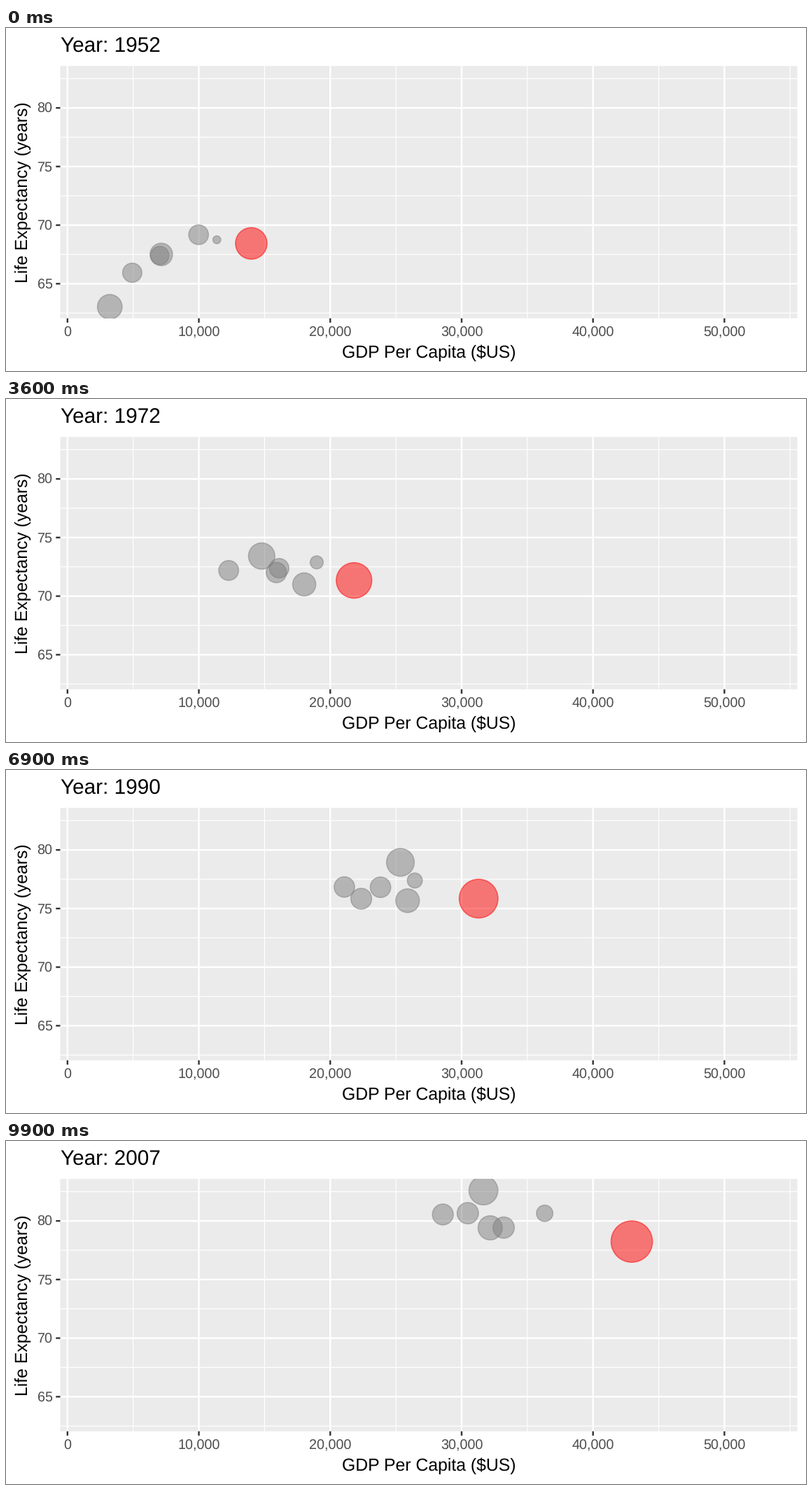
These frames come from a looping animation (1143 px wide and 490 px high, 10 s). A matplotlib script:

```python
import numpy as np
import matplotlib.pyplot as plt
from matplotlib.animation import FuncAnimation
from matplotlib.patches import Circle, Rectangle

plt.rcParams["font.family"] = "Liberation Sans"
plt.rcParams["text.hinting"] = "none"

W, H, DPI = 1143, 490, 64
FRAMES, INTERVAL = 100, 100
LEFT, RIGHT, TOP, BOTTOM = 77.5, 1130.6, 54.2, 414.7
X_LIM = (-0.55, 55.55)       # thousand dollars
Y_LIM = (62.051, 83.582)     # years of life
UNIT = 162 / 72              # px per point of the plot's theme
LINE = 1.067 * UNIT          # major line width in px
STROKE = 0.709 * UNIT        # bubble outline in px
FONT = 11 * UNIT
GREY, RED = (127 / 255,) * 3, (1, 0, 0)

START, END = 1952, 2007
GDP_YEARS = (START, 1962, 1972, 1982, 1987, 1992, END)
LIFE_YEARS = (START, 1962, 1972, 1982, END)
POP_MIN, POP_MAX = 14.8, 301.1

# Key points per country: GDP in thousands, life expectancy, population in millions
COUNTRIES = {
    "Canada": ((11.37, 13.46, 18.97, 22.90, 26.63, 26.34, 36.32),
               (68.75, 71.30, 72.88, 75.76, 80.65), (14.8, 33.4)),
    "France": ((7.03, 10.56, 16.11, 20.29, 22.07, 24.70, 30.47),
               (67.41, 70.51, 72.38, 74.89, 80.66), (42.5, 61.1)),
    "Germany": ((7.14, 12.90, 18.02, 22.03, 24.64, 26.51, 32.17),
                (67.50, 70.30, 71.00, 73.80, 79.41), (69.1, 82.4)),
    "Italy": ((4.93, 8.24, 12.27, 16.54, 19.21, 22.01, 28.57),
              (65.94, 69.24, 72.19, 74.98, 80.55), (47.7, 58.1)),
    "Japan": ((3.22, 6.58, 14.78, 19.38, 22.38, 26.82, 31.66),
              (63.03, 68.73, 73.42, 77.11, 82.60), (86.5, 127.5)),
    "United Kingdom": ((9.98, 12.48, 15.90, 18.23, 21.66, 22.71, 33.20),
                       (69.18, 70.76, 72.01, 74.04, 79.43), (50.4, 60.8)),
    "United States": ((13.99, 16.17, 21.81, 25.01, 29.88, 32.00, 42.95),
                      (68.44, 70.21, 71.34, 74.65, 78.24), (157.6, 301.1)),
}


def px(value):
    return LEFT + (value - X_LIM[0]) / (X_LIM[1] - X_LIM[0]) * (RIGHT - LEFT)


def py(value):
    return BOTTOM - (value - Y_LIM[0]) / (Y_LIM[1] - Y_LIM[0]) * (BOTTOM - TOP)


def pt(pixels):
    return pixels * 72 / DPI


def radius(pop):
    """Bubble radius in px: square-root scale from size 2 to size 12."""
    size = 2 + 10 * np.sqrt((pop - POP_MIN) / (POP_MAX - POP_MIN))
    return 0.375 * (size * 2.845 + 0.945) * UNIT


fig = plt.figure(figsize=(W / DPI, H / DPI), dpi=DPI, facecolor="white")
ax = fig.add_axes([0, 0, 1, 1])
ax.set_xlim(0, W)
ax.set_ylim(H, 0)
ax.axis("off")

panel = Rectangle((LEFT, TOP), RIGHT - LEFT, BOTTOM - TOP, fc="#EBEBEB", lw=0, snap=False)
ax.add_patch(panel)


def line(xs, ys, color, width, z):
    ax.plot(xs, ys, color=color, lw=pt(width), zorder=z, snap=False,
            solid_capstyle="butt")


def label(x, y, text, scale, color="black", **kw):
    return ax.text(x, y, text, fontsize=pt(FONT * scale), color=color,
                   va="baseline", parse_math=False, **kw)


def grid(x_values, y_values, width, z):
    for v in x_values:
        line([px(v)] * 2, [TOP, BOTTOM], "white", width, z)
    for v in y_values:
        line([LEFT, RIGHT], [py(v)] * 2, "white", width, z)


x_ticks, y_ticks = range(0, 51, 10), range(65, 81, 5)
grid(range(5, 56, 10), np.arange(62.5, 83, 5), LINE / 2, 2)
grid(x_ticks, y_ticks, LINE, 3)

tick = 2.75 * UNIT
for v in x_ticks:
    line([px(v)] * 2, [BOTTOM, BOTTOM + tick], "#333333", LINE, 3)
    label(px(v), 440.4, f"{v * 1000:,}", 0.8, "#4D4D4D", ha="center")
for v in y_ticks:
    line([LEFT - tick, LEFT], [py(v)] * 2, "#333333", LINE, 3)
    label(66.6, py(v) + 7, str(v), 0.8, "#4D4D4D", ha="right")

label((LEFT + RIGHT) / 2, 471, "GDP Per Capita ($US)", 1, ha="center")
label(31, (TOP + BOTTOM) / 2, "Life Expectancy (years)", 1, ha="center",
      rotation=90, rotation_mode="anchor")
title = label(LEFT, 35, "", 1.2, ha="left")

bubbles = {}
for z, name in enumerate(COUNTRIES, 5):
    color = (*(RED if name == "United States" else GREY), 0.5)
    bubble = Circle((0, 0), 1, fc=color, ec=color, lw=pt(STROKE), zorder=z)
    ax.add_patch(bubble)
    bubble.set_clip_path(panel)
    bubbles[name] = bubble


def update(frame):
    year = START + (END - START) * frame / (FRAMES - 1)
    title.set_text(f"Year: {round(year)}")
    for name, (gdp, life, pop) in COUNTRIES.items():
        bubble = bubbles[name]
        bubble.center = (px(np.interp(year, GDP_YEARS, gdp)),
                         py(np.interp(year, LIFE_YEARS, life)))
        bubble.set_radius(radius(np.interp(year, (START, END), pop)))
    return [title, *bubbles.values()]


anim = FuncAnimation(fig, update, frames=FRAMES, interval=INTERVAL,
                     init_func=lambda: update(0), repeat=True, repeat_delay=0)
plt.show()
```
